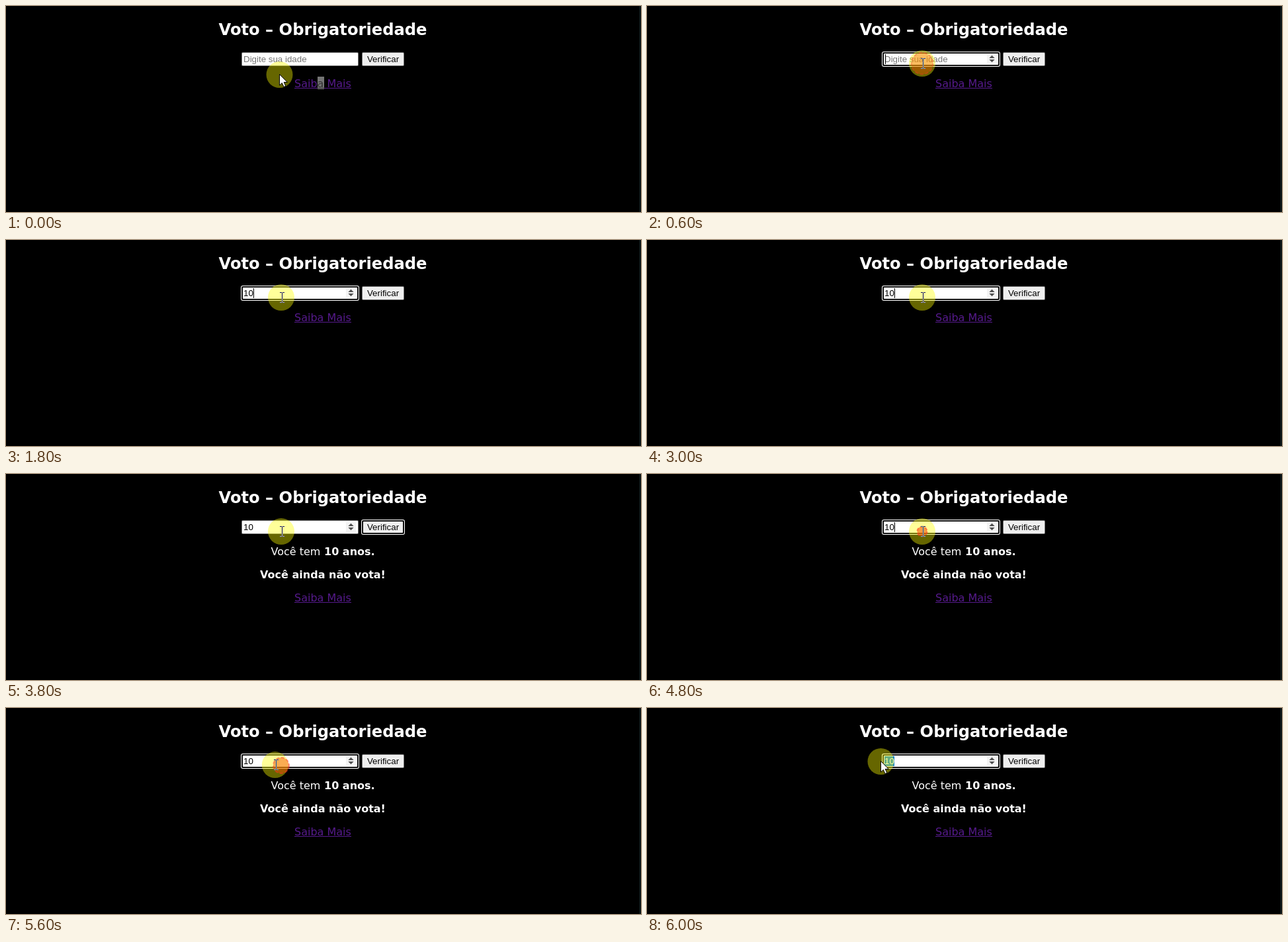
An HTML page with a canvas for the animation above (8000 ms loop, 960 by 312 pixels).

```html
<!DOCTYPE html>
<html lang="pt">
<head>
<meta charset="utf-8">
<title>Voto</title>
<style>
html, body { margin: 0; width: 100%; height: 100%; overflow: hidden; background: #000; }
canvas { display: block; }
</style>
</head>
<body>
<canvas id="stage" width="960" height="312"></canvas>
<script>
const ctx = document.getElementById('stage').getContext('2d');
const LOOP = 8000, TICK = 200, BLINK = 600, RIPPLE_LIFE = 600;
const PAGE = '16px "DejaVu Sans", sans-serif';
const TITLE = 'bold 24.2px "DejaVu Sans", sans-serif';
const FORM = '13.333px "Liberation Sans", Arial, sans-serif';

// Story moments in ms
const FOCUS = 400, TYPED = 1800, SUBMIT = 3400, ANSWER = 3800, REFOCUS = 4800, SELECT = 5800, LEAVE = 6000;
const CLICKS = [300, 4700, 5400];

const START = [413.5, 104], FIELD = [416, 87], END = [353.5, 81];

const easeInOut = u => u < .5 ? 4 * u ** 3 : 1 - 4 * (1 - u) ** 3;
const progress = (t, from, to) => easeInOut(Math.min(1, Math.max(0, (t - from) / (to - from))));
const mix = (a, b, u) => a.map((v, i) => v + (b[i] - v) * u);

function pointerAt(t) {
  return mix(mix(START, FIELD, progress(t, 0, 330)), END, progress(t, 5450, 5900));
}

function rect(color, x, y, w, h) {
  ctx.fillStyle = color;
  ctx.fillRect(x, y, w, h);
}

function box(color, x, y, w, h, r) {
  ctx.fillStyle = color;
  ctx.beginPath();
  ctx.roundRect(x, y, w, h, r);
  ctx.fill();
}

function poly(color, points) {
  ctx.fillStyle = color;
  ctx.beginPath();
  points.forEach(([x, y]) => ctx.lineTo(x, y));
  ctx.closePath();
  ctx.fill();
}

function disc(color, x, y, r) {
  ctx.fillStyle = color;
  ctx.beginPath();
  ctx.arc(x, y, r, 0, 7);
  ctx.fill();
}

function outline(color, width, dash = []) {
  ctx.strokeStyle = color;
  ctx.lineWidth = width;
  ctx.setLineDash(dash);
  ctx.stroke();
}

function text(str, x, y, font, color, align = 'left') {
  ctx.font = font;
  ctx.fillStyle = color;
  ctx.textAlign = align;
  ctx.fillText(str, x, y);
}

function control(x, w, fill, focused) {
  if (focused) {
    box('#fff', x - 1, 69, w + 2, 23, 3);
    box('#101010', x, 70, w, 21, 2);
    box(fill, x + 2, 72, w - 4, 17, 1);
  } else {
    box('#767676', x, 70, w, 21, 2);
    box(fill, x + 1, 71, w - 2, 19, 1);
  }
}

function drawField(t) {
  const focused = t >= FOCUS && t < SUBMIT || t >= REFOCUS;
  const typed = t >= TYPED, selected = t >= SELECT;
  control(356, 177, '#fff', focused);

  if (t >= FOCUS) {
    rect('#f3f3f3', 514, 73, 15, 15);
    for (const dir of [-1, 1]) {
      const y = 80 + dir;
      poly('#505050', [[517.3, y], [521.5, y + 4.3 * dir], [525.7, y]]);
    }
  }
  if (selected) rect('#0078d7', 359, 73, 15, 15);
  if (typed) text('10', 359, 85, FORM, selected ? '#fff' : '#000');
  else text('Digite sua idade', 359, 85, FORM, '#757575');

  // The caret restarts its blink at every input.
  const since = t - [FOCUS, TYPED, REFOCUS].findLast(time => time <= t);
  const lit = Math.floor(since / BLINK) % 2 === 0;
  if (focused && lit && !selected) rect('#000', typed ? 374 : 360, 73, 1, 15);
}

function drawLink(y, marked) {
  text('Saiba Mais', 436, y, PAGE, '#551a8b');
  rect('#551a8b', 436, y + 1, 86, 1);
  if (!marked) return;
  rect('#747474', 471, y - 16, 10, 19);
  text('a', 470.6, y, PAGE, '#333');
  rect('#333', 471, y + 1, 10, 1);
}

function drawRipple(age) {
  const alpha = .65 * (1 - age / 700);
  disc(`rgba(245,75,0,${alpha})`, ...FIELD, 3 + .045 * age);
  outline(`rgba(255,50,40,${alpha})`, 2, [5, 3]);
}

function drawArrow(x, y) {
  const shape = [[0, 0], [0, 16.5], [3.8, 13], [6.5, 19], [9.3, 17.8], [6.7, 12], [11.8, 12]];
  poly('#fff', shape.map(([dx, dy]) => [x + dx, y + dy]));
  outline('#000', 1);
}

function drawBeam(x, y) {
  ctx.globalCompositeOperation = 'difference';
  for (const dy of [-8, 7]) {
    rect('#fff', x - 3, y + dy, 3, 1);
    rect('#fff', x + 1, y + dy, 3, 1);
  }
  rect('#fff', x, y - 7, 1, 14);
  ctx.globalCompositeOperation = 'source-over';
}

function drawPointer(t) {
  const [x, y] = pointerAt(t);
  disc('rgba(255,255,0,.4)', x, y, 20);
  for (const click of CLICKS) {
    const age = t - click;
    if (age >= 0 && age < RIPPLE_LIFE) drawRipple(age);
  }
  if (t < FOCUS || t >= LEAVE) drawArrow(Math.floor(x) + .5, Math.floor(y) - .5);
  else drawBeam(Math.round(x) + 1, Math.round(y));
}

function draw(t) {
  const answered = t >= ANSWER;
  rect('#000', 0, 0, 960, 312);
  rect('#1c3034', 958, 0, 1, 312);
  text('Voto – Obrigatoriedade', 479, 44, TITLE, '#fff', 'center');
  drawField(t);
  control(538, 64, '#efefef', t >= SUBMIT && t < REFOCUS);
  text('Verificar', 570, 85, FORM, '#000', 'center');

  if (answered) {
    text('Você tem ', 400.5, 123, PAGE, '#fff');
    text('10 anos.', 481, 123, 'bold ' + PAGE, '#fff');
    text('Você ainda não vota!', 479, 158, 'bold ' + PAGE, '#fff', 'center');
  }
  drawLink(answered ? 193 : 123, t < FOCUS);
  drawPointer(t);
}

const start = performance.now();
function frame() {
  const t = (performance.now() - start) % LOOP;
  draw(Math.floor(t / TICK) * TICK);
  requestAnimationFrame(frame);
}
frame();
</script>
</body>
</html>
```
